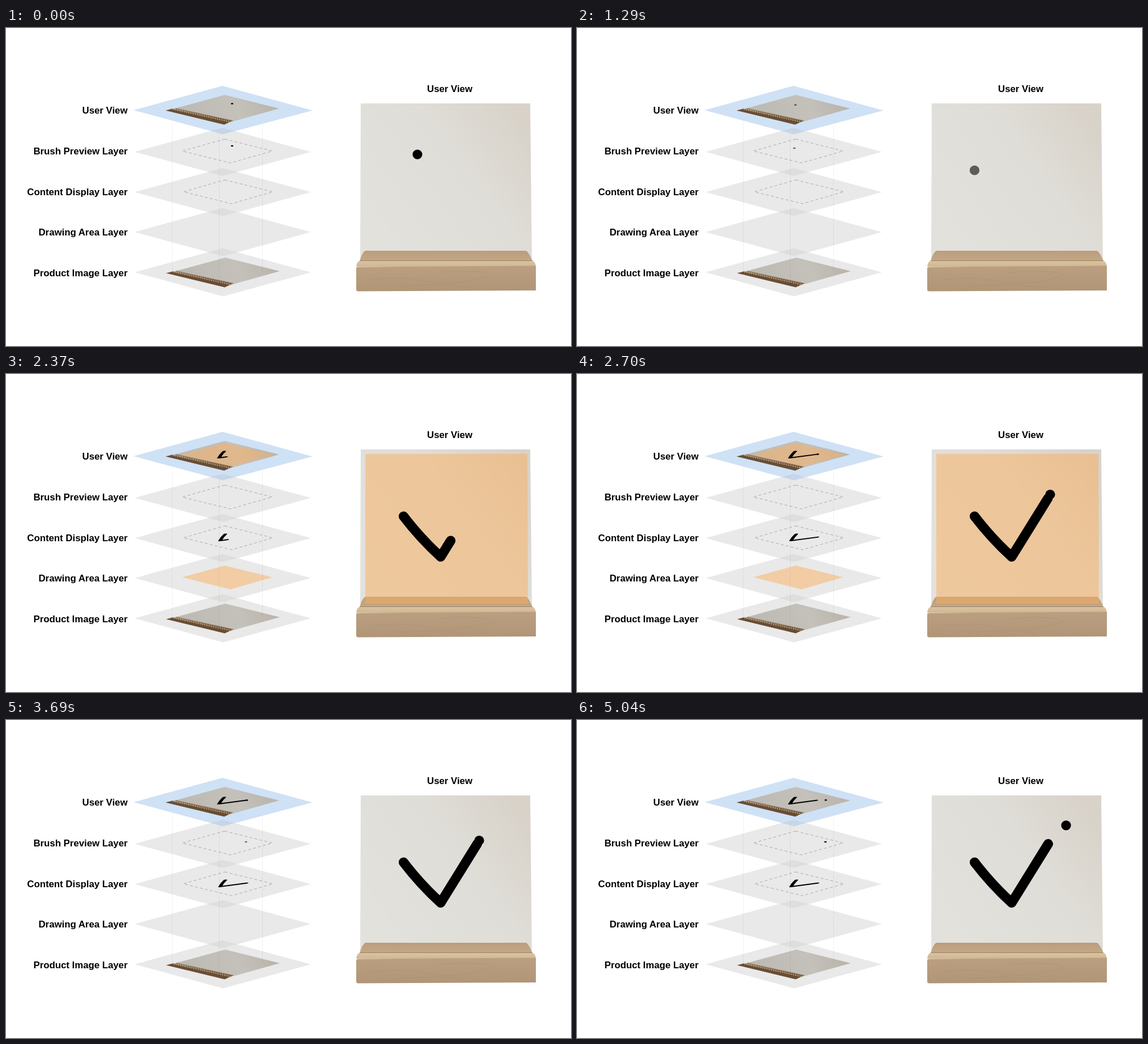
An HTML page for the animation above (5070 ms loop, 997x561 px).

```html
<!DOCTYPE html>
<html lang="en">
<head>
<meta charset="utf-8">
<title>Drawing layers</title>
<style>
  html, body { margin: 0; width: 100%; height: 100%; overflow: hidden; background: #fff; }
  svg { display: block; width: 997px; height: 561px; }
  text { font: bold 16.8px "Liberation Sans", Arial, sans-serif; fill: #000; }
  .plane { fill: #e9e9e9; }
  .overlap { fill: #5a5946; fill-opacity: .08; }
  .dashed { fill: none; stroke: #a9a9a9; stroke-width: 1; stroke-dasharray: 5 4; }
  .guide { stroke: #000; stroke-opacity: .05; fill: none; }
  .tint { fill: #fcaf60; fill-opacity: .5; }
  .stroke { fill: none; stroke: #000; stroke-width: 17; stroke-linecap: round; stroke-linejoin: round; }
</style>
</head>
<body>
<svg viewBox="0 0 997 561">
  <defs>
    <linearGradient id="glass" x1=".1" y1=".8" x2="1" y2=".2">
      <stop offset="0" stop-color="#e2e1dc"/>
      <stop offset=".6" stop-color="#dfddd7"/>
      <stop offset="1" stop-color="#d8d2c9"/>
    </linearGradient>
    <linearGradient id="ledge" x1="0" y1="0" x2="0" y2="1">
      <stop offset="0" stop-color="#b99d7d"/>
      <stop offset="1" stop-color="#c4a885"/>
    </linearGradient>
    <linearGradient id="strip" x1="0" y1="0" x2="0" y2="1">
      <stop offset="0" stop-color="#d9c3a3"/>
      <stop offset="1" stop-color="#d2b791"/>
    </linearGradient>
    <linearGradient id="front" x1="0" y1="0" x2="0" y2="1">
      <stop offset="0" stop-color="#bb9f80"/>
      <stop offset="1" stop-color="#b09577"/>
    </linearGradient>
    <linearGradient id="smallGlass" x1="0" y1=".5" x2="1" y2=".4">
      <stop offset="0" stop-color="#bcb9b3"/>
      <stop offset=".6" stop-color="#c4c1bb"/>
      <stop offset="1" stop-color="#b9b3a9"/>
    </linearGradient>
    <g id="product" fill="none">
      <path d="M386 118L482 142L400 165L296 142.5Z" fill="url(#smallGlass)"/>
      <path d="M281.5 145.5L294 142.2L399 164L385 170.5Z" fill="#684d34"/>
      <path d="M299 142L400 163.8" stroke="#8e7355" stroke-width="1.4"/>
      <path d="M294 143.2L397 166" stroke="#c9b08c" stroke-width="1.5" stroke-dasharray="2.4 1.6"/>
    </g>
  </defs>

  <g id="labels"></g>
  <g id="planes"></g>

  <use href="#product" x="1" y="287"/>
  <path class="tint fade" d="M386 338L470 358.5L396 380L311 358.5Z"/>
  <path class="dashed" d="M386 196L470 217L396 238L311 217Z"/>
  <path class="dashed" d="M386 268L471 289L398 310L313 289Z"/>
  <path class="guide" d="M293.5 146V433M376.5 168V455M452.5 142V430"/>

  <path d="M225 145L382 102L541 145.5L383 187.5Z" fill="#cfe1f5"/>
  <path class="overlap" d="M382 176L403 181.8L383 187.5L361 181.8Z"/>
  <use href="#product"/>
  <path class="tint fade" d="M386 121.5L473 142.5L398 163L309 142.5Z"/>

  <g transform="matrix(.2085 .0655 -.3216 .1002 319.46 65.4)"><path class="stroke"/></g>
  <g transform="matrix(.2085 .0655 -.3216 .1002 321.46 211.4)"><path class="stroke"/></g>
  <ellipse id="dotUser" rx="2.3" ry="1.3"/>
  <ellipse id="dotPreview" rx="2.3" ry="1.3"/>

  <path d="M626 133H925L928 411H625Z" fill="url(#glass)"/>
  <path d="M634 393H918Q922 395 929 411H624Q629 395 634 393Z" fill="url(#ledge)"/>
  <path d="M623 411H930Q934 413 935 421H618Q619 413 623 411Z" fill="url(#strip)"/>
  <path d="M624 410.5H929" stroke="#9c8163" stroke-width="1.2"/>
  <path d="M618 424Q618 421.5 622 421.5L935 419.5V463L621 464.5Q618 464 618 461Z" fill="url(#front)"/>
  <path d="M640 445Q700 436 745 447T860 436M760 432Q800 427 850 431M690 456Q760 450 810 457"
        fill="none" stroke="#a4886a" stroke-opacity=".35"/>
  <path class="tint fade" d="M634 141H920L921 405H634Z"/>
  <circle id="halo" cx="704" cy="254" r="8" fill-opacity=".25"/>
  <path class="stroke"/>
  <circle id="dot" r="8.6"/>
</svg>
<script>
const LOOP = 5070, STEP = 30;
const $ = id => document.getElementById(id);
const all = sel => [...document.querySelectorAll(sel)];

const label = (text, x, y, anchor) => `<text x="${x}" y="${y}" text-anchor="${anchor}">${text}</text>`;
$('labels').innerHTML = label('User View', 783, 113.3, 'middle') + [
  'User View', 'Brush Preview Layer', 'Content Display Layer', 'Drawing Area Layer', 'Product Image Layer'
].map((name, i) => label(name, 214.5, 150.7 + i * 71.9, 'end')).join('');

const rhombus = (cls, y, w, h) =>
  `<path class="${cls}" d="M${382.5 - w} ${y}L382 ${y - h}L${382.5 + w} ${y}L383 ${y + h}Z"/>`;
const levels = [218.5, 289.5, 360, 431];
$('planes').innerHTML =
  levels.map(y => rhombus('plane', y, 155.5, 42.4)).join('') +
  levels.slice(1).map((y, i) => rhombus('overlap', (y + levels[i]) / 2, 26, 7)).join('');

const ramp = (t, a, b) => Math.min(1, Math.max(0, (t - a) / (b - a)));
const ease = p => (1 - Math.cos(Math.PI * p)) / 2;
const mix = (a, b, p) => a.map((v, i) => v + (b[i] - v) * p);

// The tick is one path, revealed by its dash length.
const strokes = all('.stroke'), tints = all('.fade');
for (const el of strokes) {
  el.setAttribute('d', 'M701.5 251Q731 289.5 767 322.5L831.5 218.5');
  el.setAttribute('pathLength', 1);
}

// Dot routes: approach at the beginning, departure at the end.
const routes = [
  { el: $('dot'), from: [726, 223], to: [701.5, 251], leave: [835, 212.5], exit: [863.5, 185.5] },
  { el: $('dotUser'), from: [399, 133.5], to: [385.5, 135.8], leave: [425, 141.5], exit: [439.2, 141.2] },
  { el: $('dotPreview'), from: [399, 208], to: [383.5, 212], leave: [423.5, 215], exit: [438.7, 215] }
];
const trimmed = ease(250 / 1300);

function draw(t) {
  const area = ramp(t, 1620, 1740);
  const tint = area * (1 - ramp(t, 3150, 3240));
  tints.forEach(el => el.style.opacity = tint);

  const drawn = ramp(t, 1878, 2705);
  for (const el of strokes) {
    el.style.strokeDasharray = `${Math.max(drawn, .0005)} 2`;
    el.style.opacity = area;
  }
  $('halo').style.opacity = area;

  const arrive = (ease(ramp(t, -250, 1050)) - trimmed) / (1 - trimmed);
  const depart = ease(ramp(t, 4020, 5130));
  const early = t < 1640;
  for (const r of routes) {
    const [x, y] = early ? mix(r.from, r.to, arrive) : mix(r.leave, r.exit, depart);
    r.el.setAttribute('cx', x);
    r.el.setAttribute('cy', y);
    const late = r.el.id === 'dotPreview' ? ramp(t, 3410, 3940) : +(t >= 2700);
    r.el.style.opacity = early ? 1 - ramp(t, 1080, 1590) : late;
  }
}

const origin = performance.now();
function tick() {
  const t = (performance.now() - origin) % LOOP;
  draw(Math.floor(t / STEP) * STEP);
  requestAnimationFrame(tick);
}
draw(0);
requestAnimationFrame(tick);
</script>
</body>
</html>
```
